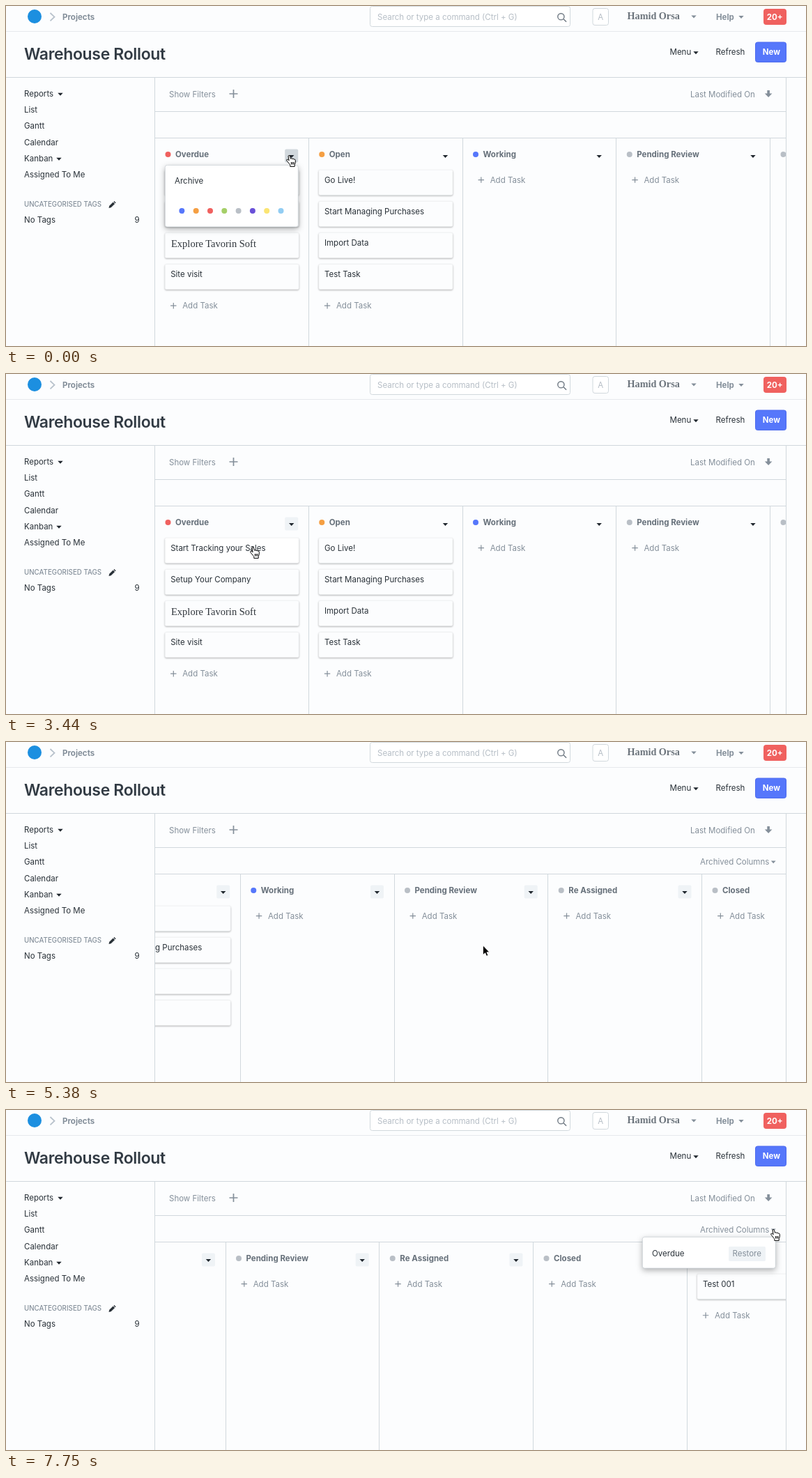
These frames come from a looping animation (1148x488 px, 8 s). An HTML page:

```html
<!DOCTYPE html>
<html lang="en">
<head>
<meta charset="utf-8">
<title>Kanban board</title>
<style>
  html, body { margin: 0; width: 100%; height: 100%; overflow: hidden; background: #fcfdfe; }
  svg { display: block; width: 100vw; height: 100vh; }
  text { font: 11.5px Inter, "Open Sans", sans-serif; fill: #293138; white-space: pre; }
  .grey { fill: #848f9a; }
  .pale { fill: #b6bec6; }
  .white { fill: #fff; }
  .bold { font-weight: 700; }
  .head { font-weight: 700; fill: #66707a; }
  .title { font-size: 23px; font-weight: 600; letter-spacing: -.35px; fill: #323b44; }
  .tags { font-size: 9.75px; font-weight: 500; fill: #848f9a; }
  .user { font: bold 14.2px "Liberation Serif", serif; fill: #6c747c; }
  .serif { font: 14.5px "Liberation Serif", serif; fill: #30363c; }
  .line { fill: none; stroke: #d1d8dd; }
  .card { fill: #fcfdfe; stroke: #f0f2f4; stroke-width: .6; filter: drop-shadow(0 1px 1px rgba(0,0,0,.3)); }
  .menu { fill: #fff; stroke: #c5ccd2; stroke-width: .7; filter: drop-shadow(0 3px 4px rgba(0,0,0,.3)); }
  .btn { fill: #eff3f6; }
</style>
</head>
<body>
<svg id="stage" viewBox="0 0 1148 488"></svg>
<script>
const LOOP = 8000, COL = 220.75, ROW = 45.15;
const BLUE = '#5677fb', ORANGE = '#f59f43', RED = '#f0615f', GREY = '#b9bfc6';

const text = (x, y, s, c = '') => `<text x="${x}" y="${y}" class="${c}">${s}</text>`;
const rect = (x, y, w, h, attrs, r = 2) =>
  `<rect x="${x}" y="${y}" width="${w}" height="${h}" rx="${r}" ${attrs}/>`;
const dot = (x, y, fill, r = 4) => `<circle cx="${x}" cy="${y}" r="${r}" fill="${fill}"/>`;
const path = (d, attrs) => `<path d="${d}" ${attrs}/>`;
const line = d => path(d, 'class="line"');
const caret = (x, y, fill = '#20272e', w = 3.7) =>
  path(`M${x - w} ${y - 2}h${2 * w}l${-w} ${w + .3}z`, `fill="${fill}"`);
const plus = (x, y, r, w) =>
  path(`M${x - r} ${y}h${2 * r}M${x} ${y - r}v${2 * r}`, `stroke="#848f9a" stroke-width="${w}"`);
const group = (id, body) => `<g id="${id}">${body}</g>`;

// One board column at slot i
function column(i, [name, colour, cards = []]) {
  const x = 214 + i * COL;
  const list = cards.map((label, n) => {
    const y = 235.3 + n * ROW, serif = label.startsWith('Explore');
    return rect(x + 14.2, y, 192, 36, 'class="card"') +
      text(x + (serif ? 23 : 22.2), y + (serif ? 20.2 : 18.4), label, serif ? 'serif' : '');
  }).join('');
  const y = 249.6 + cards.length * ROW;
  return line(`M${Math.round(x + COL) - .5} 190V488`) +
    dot(x + 18.5, 213, colour) + text(x + 29, 217.2, name, 'head') +
    rect(x + 186.2, 205.5, 19, 19, 'class="btn"') + caret(x + 195.7, 216) + list +
    plus(x + 26.3, y, 4.2, 1.2) + text(x + 39.2, y + 4.2, 'Add Task', 'grey');
}
const columns = list => list.map((c, i) => column(i, c)).join('');

const explore = 'Explore Tavorin Soft';
const openCards = third => ['Go Live!', 'Start Managing Purchases', third, 'Test Task'];
const overdue = ['Overdue', RED, ['Start Tracking your Sales', 'Setup Your Company', explore, 'Site visit']];
const open = third => ['Open', ORANGE, openCards(third)];
const rest = [['Working', BLUE], ['Pending Review', GREY], ['Re Assigned', GREY],
  ['Closed', GREY], ['Cancelled', GREY, ['Test 001']]];

const navbar =
  dot(41, 15, '#1c8fe0', 10) +
  path('M63.5 10l6 5.7l-6 5.7', 'fill="none" stroke="#b8c2cc" stroke-width="1.8"') +
  text(81, 20, 'Projects', 'bold grey') +
  rect(522.5, .5, 287, 29, 'fill="#fff" stroke="#d1d8dd"', 3) +
  text(533, 20.2, 'Search or type a command (Ctrl + G)', 'pale') +
  path('M799.8 18.6l4.3 4.2M801 15.3a4.6 4.6 0 1 1-9.2 0a4.6 4.6 0 1 1 9.2 0',
    'fill="none" stroke="#6c7680" stroke-width="1.4"') +
  rect(842, 3.5, 22.5, 24, 'fill="#fff" stroke="#d1d8dd"', 3) + text(849.3, 19.7, 'A', 'pale') +
  text(891.5, 18.5, 'Hamid Orsa', 'user') + caret(987, 15.5, '#848f9a') +
  text(1019, 19.5, 'Help', 'bold grey') + caret(1055, 16, '#848f9a') +
  rect(1087, 4, 33, 23, `fill="${RED}"`, 4) + text(1091.7, 19.7, '20+', 'bold white') +
  path('M0 36.5H1148', 'stroke="#e6e9ec"');

const header =
  text(26, 77, 'Warehouse Rollout', 'title') +
  text(952.5, 70, 'Menu') + caret(990, 67.3) + text(1018.5, 70, 'Refresh') +
  rect(1075.5, 52, 44, 28.5, `fill="${BLUE}" stroke="#4c6bee"`, 3) +
  text(1085.7, 70.3, 'New', 'bold white') +
  line('M0 102.5H1148M213.5 103V488M1119.5 103V488M214 151.5H1119M214 189.5H1119');

const sidebar =
  ['Reports', 'List', 'Gantt', 'Calendar', 'Kanban', 'Assigned To Me']
    .map((s, i) => text(26, 130 + i * 23.2, s)).join('') +
  caret(78, 126.8) + caret(76, 219.8) +
  text(26, 288.3, 'UNCATEGORISED TAGS', 'tags') +
  path('M147.5 290l.8-3.2l5.4-5.2l2.4 2.4l-5.4 5.2zM154.4 280.9l1-.9l2.3 2.3l-1 1z', 'fill="#293138"') +
  text(26, 310.5, 'No Tags') + text(184.5, 310.5, '9');

const filters =
  text(234, 130.7, 'Show Filters', 'grey') + plus(326.5, 126, 6, 1.7) +
  text(982, 130.7, 'Last Modified On', 'grey') +
  path('M1092.3 121h3.6v4.5h3.5l-5.3 5.5l-5.3-5.5h3.5z', 'fill="#848f9a"');

const archive = rect(228.3, 228.4, 191, 88.6, 'class="menu"', 3) + text(242, 254.8, 'Archive') +
  [BLUE, ORANGE, RED, '#a5cf68', GREY, '#6950d8', '#fbe573', '#92cdf3']
    .map((c, i) => dot(252.4 + i * 20.3, 294, c)).join('');

const restore = rect(913.3, 182.3, 191, 44.8, 'class="menu"', 3) + text(927, 209.6, 'Overdue') +
  rect(1037, 196, 53, 21, 'fill="#eff3f6"') + text(1042.5, 210.4, 'Restore', 'grey');

const hand = path('M4.3 12.2L1.2 8.4Q.1 6.6 1.4 6.1Q2.6 5.8 4.1 7.8L3.1 2Q3 .7 4 .5Q5.2 .4 5.5 1.6L6.4 5.2' +
  'Q8 4.2 8.8 5.4Q10.3 4.7 11.1 6Q12.9 5.5 13.3 7.4V10.2Q13.2 12 12.2 13.7V16.4H5.8V14.6Q5.3 13.2 4.3 12.2z' +
  'M7.4 10v3.5M9.2 10v3.5M11 10v3.5', 'fill="#fff" stroke="#000" stroke-linejoin="round"');
const arrow = path('M.5 0V13.6L3.6 10.7L5.5 15.2L7.8 14.2L5.9 9.8H9.8z',
  'fill="#000" stroke="#fff" stroke-width=".8"');

document.getElementById('stage').innerHTML =
  '<clipPath id="clip"><path d="M214 190H1119V488H214z"/></clipPath>' +
  navbar + header + sidebar + filters +
  group('archived', text(996, 175.8, 'Archived Columns', 'grey') + caret(1101.2, 172.5, '#848f9a', 3.4)) +
  '<g clip-path="url(#clip)">' +
  group('before', columns([overdue, open('Import Data'), ...rest.slice(0, 3)])) +
  group('after', columns([open(explore), ...rest])) +
  group('settled', columns([open('Import Data'), ...rest])) +
  '</g>' + group('archive', archive) + group('restore', restore) +
  group('hand', hand) + group('arrow', arrow);

// [time, x, y] of the pointer; [time, offset] of the board
const pointer = [
  [0, 402, 214], [750, 388, 228], [900, 365, 241], [1050, 347, 247], [1200, 343, 248],
  [3440, 350, 248], [3590, 358, 248],
  [4040, 435, 239], [4190, 520, 262], [4340, 640, 287], [4490, 684, 292],
  [5970, 740, 276], [6120, 880, 232], [6260, 1035, 188], [6410, 1107, 171],
  [6560, 1114, 174], [6710, 1104, 171], [7300, 1097, 174], [7450, 1097, 171]];
const scroll = [[0, 0], [4930, 24], [5080, 60], [5380, 98], [5520, 245], [5670, 340]];
const at = (keys, t) => keys.filter(k => k[0] <= t).pop();

const el = {};
document.querySelectorAll('g[id]').forEach(g => el[g.id] = g);
const show = (node, on) => node.style.display = on ? '' : 'none';
const firstCard = el.before.querySelector('.card');
const buttons = [...document.querySelectorAll('.btn')];

function frame(now) {
  const t = now % LOOP, gone = t >= 4040;
  show(el.archive, t < 1950);
  show(el.before, !gone);
  show(el.archived, gone);
  show(el.after, gone && t < 4190);
  show(el.settled, t >= 4190);
  show(el.restore, t >= 7750);

  firstCard.style.fill = t >= 2240 ? '#fff' : '';
  buttons.forEach((b, i) => show(b, i === 0 || t >= 4930));
  buttons[0].style.fill = t < 1950 ? '#d1d8dd' : '';
  el.settled.setAttribute('transform', `translate(${-at(scroll, t)[1]} 0)`);

  const [, x, y] = at(pointer, t), pointing = !gone || t >= 7300;
  show(el.hand, pointing);
  show(el.arrow, !pointing);
  for (const c of [el.hand, el.arrow]) c.setAttribute('transform', `translate(${x} ${y})`);
  requestAnimationFrame(() => frame(performance.now()));
}
frame(performance.now());
</script>
</body>
</html>
```
